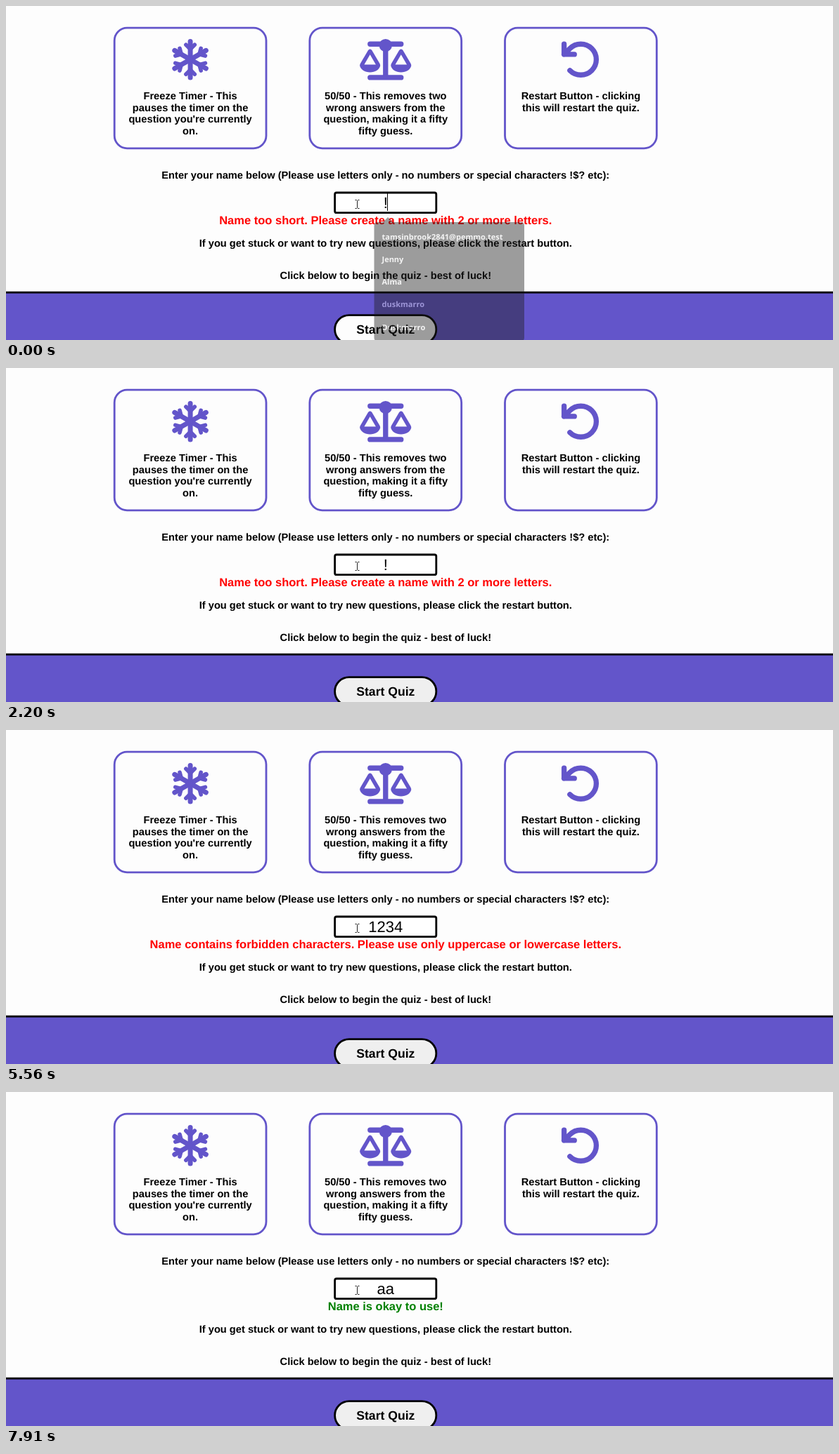
An HTML page that plays this animation: 1176x476 px, repeating every 8000 ms.

```html
<!DOCTYPE html>
<html lang="en">
<head>
<meta charset="utf-8">
<title>Quiz name check</title>
<style>
html, body { margin: 0; width: 100%; height: 100%; overflow: hidden; background: #fdfdfd; }
svg { display: block; }
text { text-rendering: geometricPrecision; white-space: pre; }
.page text { font: bold 14.67px "Liberation Sans", Arial, sans-serif; text-anchor: middle; }
.page #message { font-size: 16.5px; }
.page #start { font-size: 17.6px; }
.page #entry { font-weight: normal; font-size: 22px; }
#popup text { font: bold 11px "Open Sans", "Noto Sans", sans-serif; fill: #e8e8e8; }
.line { fill: none; stroke: #6355ca; stroke-linecap: round; stroke-linejoin: round; }
.solid { fill: #6355ca; }
</style>
</head>
<body>
<svg width="1176" height="476" viewBox="0 0 1176 476">
  <defs>
    <g id="arm" class="line">
      <path d="M0 0V-25.7" stroke-width="7"/>
      <path d="M-6.2 -21L0 -14.8L6.2 -21" stroke-width="5.6"/>
    </g>
    <path id="pan" class="solid" fill-rule="evenodd" d="M440 320H584L512 196ZM386 337Q383 322 393 305L488 142Q496 128 512 128T536 142L631 305Q641 322 638 337C627 382 575 416 512 416S397 382 386 337Z"/>
  </defs>
  <g class="page">
    <g id="cards"></g>
    <g id="flake" transform="translate(262.1 76.2)"></g>
    <g transform="translate(503.1 46.9) scale(.1146)">
      <path class="line" stroke-width="64" d="M128 64H512M128 480H512M320 80V480"/>
      <circle class="solid" cx="320" cy="80" r="80"/>
      <use href="#pan"/>
      <use href="#pan" x="-385"/>
    </g>
    <path class="line" stroke-width="64" transform="translate(788.1 46.9) scale(.1146)" d="M48 64V192H176M48 192L120 120A192 192 0 1 1 120 392"/>

    <text x="539.8" y="246">Enter your name below (Please use letters only - no numbers or special characters !$? etc):</text>
    <rect x="467.6" y="266" width="144.2" height="28.7" rx="2.5" fill="#fff" stroke="#000" stroke-width="2.8"/>
    <text id="entry" x="539.8" y="288"></text>
    <rect id="caret" y="267" width="1" height="25"/>
    <path d="M496.5 276.5h2l1 1l1 -1h2M499.5 277.5v10M496.5 288.5h2l1 -1l1 1h2" fill="none" stroke="#222"/>
    <text id="message" x="539.8" y="311"></text>
    <text x="539.8" y="343">If you get stuck or want to try new questions, please click the restart button.</text>
    <text x="539.8" y="389">Click below to begin the quiz - best of luck!</text>

    <rect y="408" width="1176" height="68" fill="#6355ca"/>
    <rect y="406.8" width="1176" height="2.8"/>
    <rect id="button" x="467.6" y="440.6" width="144.2" height="40.6" rx="20.3" stroke="#000" stroke-width="2.8"/>
    <text id="start" x="539.8" y="467">Start Quiz</text>
  </g>
  <g id="popup"></g>
</svg>
<script>
const $ = id => document.getElementById(id);

const cards = [
  ["Freeze Timer - This", "pauses the timer on the", "question you're currently", "on."],
  ["50/50 - This removes two", "wrong answers from the", "question, making it a fifty", "fifty guess."],
  ["Restart Button - clicking", "this will restart the quiz."]
];
$("cards").innerHTML = cards.map((lines, i) => {
  const x = 262.1 + i * 277.65;
  return `<rect x="${x - 107.9}" y="31.2" width="215.8" height="171.6" rx="18" class="line" stroke-width="2.8"/>` +
    lines.map((s, n) => `<text x="${x}" y="${133 + n * 16.5}">${s}</text>`).join("");
}).join("");
$("flake").innerHTML = [0, 60, 120, 180, 240, 300]
  .map(a => `<use href="#arm" transform="rotate(${a})"/>`).join("");

const short = "Name too short. Please create a name with 2 or more letters.";
const bad = "Name contains forbidden characters. Please use only uppercase or lowercase letters.";
const okay = "Name is okay to use!";

function suggestions(names, width, fading) {
  const rows = names.map((s, i) => `<text x="531.5" y="${329.7 + i * 32.2}">${s}</text>`).join("");
  const place = fading ? 'opacity=".43" transform="translate(3 3)"' : "";
  return `<g ${place}><path d="M520.5 310q0 -5 5 -5h7.5l7 -7l7 7h${width - 31.5}q5 0 5 5v${names.length * 32.2 - 1.4}q0 5 -5 5h${10 - width}q-5 0 -5 -5z" fill="#1f1f1f"/>${rows}</g>`;
}
const history = suggestions(["tamsinbrook2841@pemmo.test", "Jenny", "Alma", "duskmarro", "Duskmarro"], 213.5, true);
const matches = fading => suggestions(["Alma", "a"], 143.5, fading);

// time, typed text, caret shown, popup
const steps = [
  [0, "!", 1, history],
  [120, "!!", 1], [370, "!!!", 1], [900, "!!!", 0], [1550, "!!!", 1],
  [2080, "!!", 0], [2200, "!", 0], [2570, "", 1], [3100, "", 0],
  [3620, "12", 1], [4150, "123", 1], [4430, "1234", 1], [4680, "123456", 1], [4800, "1234567", 1],
  [5170, "123456", 1], [5320, "12345", 0], [5440, "12345", 1], [5560, "1234", 0], [5680, "1234", 1],
  [5810, "123", 0], [5950, "12", 0], [6070, "1", 0], [6190, "", 0], [6310, "", 1], [6840, "", 0],
  [7110, "a", 1, matches(false)], [7390, "aa", 1, matches(true)], [7520, "aa", 1], [7910, "aa", 0]
];

let shown;
function draw() {
  const t = performance.now() % 8000;
  const step = steps.findLast(s => s[0] <= t);
  if (step !== shown) {
    shown = step;
    const [start, typed, caret, popup = ""] = step;
    const entry = $("entry"), message = $("message");
    entry.textContent = typed;
    const width = typed ? entry.getComputedTextLength() : 0;
    $("caret").setAttribute("x", Math.max(540, Math.floor(539.8 + width / 2)));
    $("caret").setAttribute("opacity", caret);
    const valid = /^[a-z]{2,}$/i.test(typed);
    message.textContent = typed.length < 2 ? short : valid ? okay : bad;
    message.setAttribute("fill", valid ? "#008000" : "#f00");
    $("button").setAttribute("fill", start ? "#efefef" : "#fdfdfd");
    $("popup").innerHTML = popup;
  }
  requestAnimationFrame(draw);
}
draw();
</script>
</body>
</html>
```
